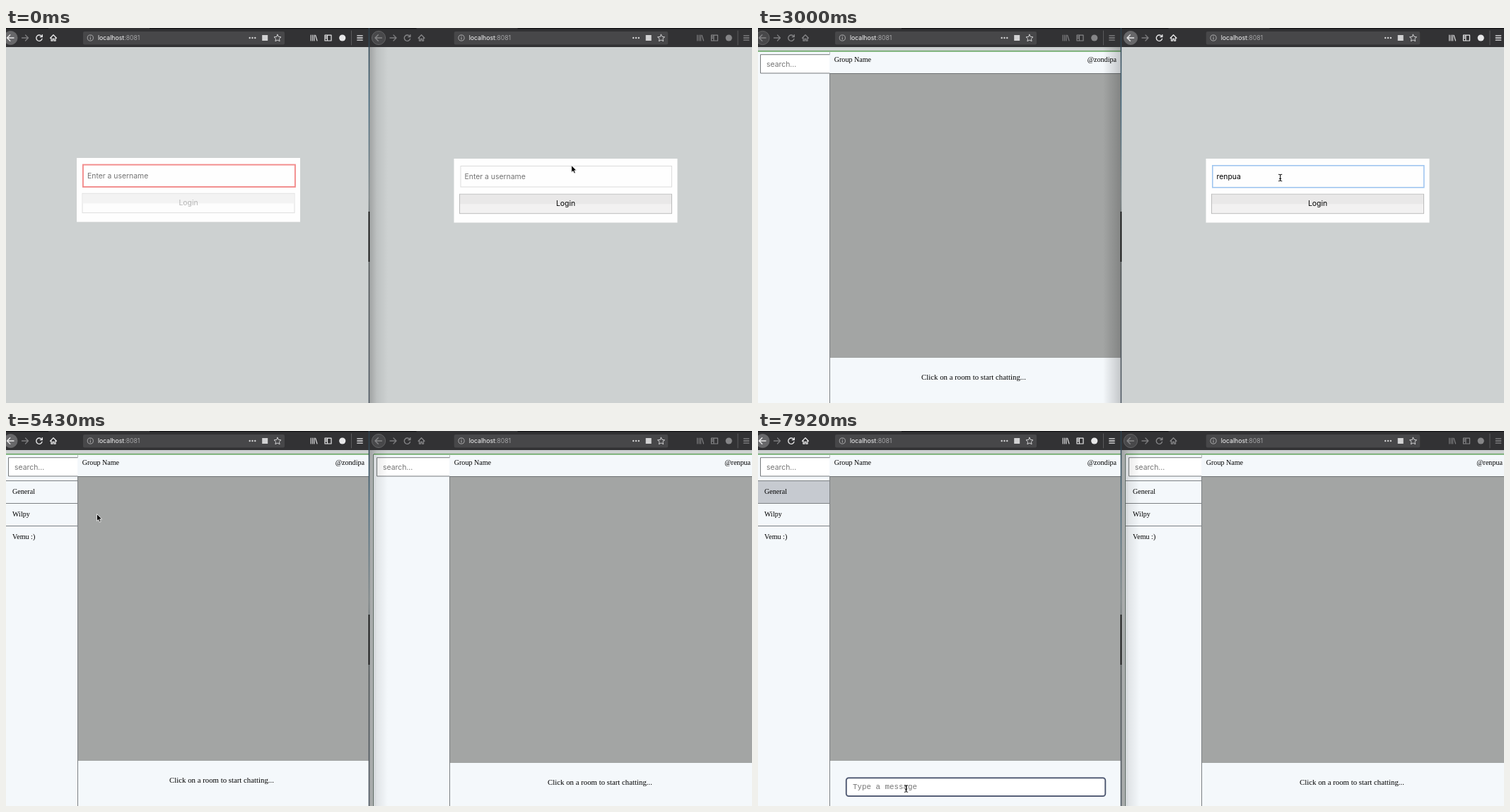
An HTML page for the animation above (8 s loop, 1055 by 531 pixels).

```html
<!DOCTYPE html>
<html lang="en">
<head>
<meta charset="utf-8">
<title>Chat login</title>
<style>
html, body { margin: 0; width: 100%; height: 100%; overflow: hidden; background: #cdd1d1; }
svg { display: block; }
text { white-space: pre; }
.ui { font-family: Inter, sans-serif; font-size: 10.4px; }
.url { font-family: Inter, sans-serif; font-size: 8.7px; }
.serif { font-family: "Liberation Serif", serif; font-size: 10.1px; }
.mono { font-family: "Liberation Mono", monospace; font-size: 10.83px; }
</style>
</head>
<body>
<svg id="stage" width="1055" height="531" viewBox="0 0 1055 531"></svg>
<script>
const rect = (x, y, w, h, fill, more = '') =>
  `<rect x="${x}" y="${y}" width="${w}" height="${h}" fill="${fill}" ${more}/>`;
const text = (x, y, cls, str, fill = '#000', more = '') =>
  `<text x="${x}" y="${y}" class="${cls}" fill="${fill}" ${more}>${str}</text>`;
const line = (d, color = 'currentColor', w = 1.2) =>
  `<path d="${d}" fill="none" stroke="${color}" stroke-width="${w}" stroke-linecap="round" stroke-linejoin="round"/>`;
const group = (id, body, dx = 0, dy = 0) =>
  `<g id="${id}" transform="translate(${dx} ${dy})">${body}</g>`;
const MID = 'text-anchor="middle"', END = 'text-anchor="end"';
const PAGE = '#cdd1d1', PANEL = '#f4f8fb', RULE = '#7d8184';

// Browser toolbar; the groups shift separately because the windows differ in width
function toolbar(p, x, w, urlW, dNav, dUrl, dStar, dMenu) {
  const nav =
    `<circle id="${p}Back" cx="6.5" cy="14" r="9.6" stroke="#6c6c6e" stroke-width=".8"/>` +
    line('M11 14H1.5M5.8 9.7L1.5 14l4.3 4.3', 'currentColor', 1.4) +
    line('M22.5 14H31.5M27.5 10l4 4-4 4', '#7c7c7e', 1.3) +
    line('M50.6 12A4.2 4.2 0 1 0 51 15.4M51.3 9.6v3h-3', 'currentColor', 1.4) +
    line('M62.6 14.2L67 9.8l4.4 4.4M64 13.8V18.2h2v-2.8h2v2.8h2v-4.4', 'currentColor', 1.3);
  const url =
    rect(109, 5, urlW, 18.6, '#474749', 'rx="2"') +
    '<circle cx="119.3" cy="14" r="4.1" fill="none" stroke="#b4b4b5" stroke-width=".9"/>' +
    line('M119.3 13.6v2.4M119.3 11.8v.1', '#b4b4b5', 1) +
    text(130, 17.2, 'url', 'localhost<tspan fill="#a5a5a7">:8081</tspan>', '#f9f9fa');
  const star =
    [344.7, 348.5, 352.3].map(cx => `<circle cx="${cx}" cy="14" r="1.2" fill="#d2d2d3"/>`).join('') +
    rect(362.2, 10, 8, 8, '#d2d2d3') +
    line('M384 9.2l1.5 3.2 3.5.4-2.6 2.4.7 3.5-3.1-1.7-3.1 1.7.7-3.5-2.6-2.4 3.5-.4z', '#d2d2d3', 1);
  const menu =
    line('M431.2 10v8M433.7 10v8M436 10v8M437.6 10.2l2.4 7.8', 'currentColor', 1.1) +
    line('M451 10.2h9v7.8h-9zM454.4 10.2v7.8M452.3 12.4h.8M452.3 14.4h.8') +
    '<circle cx="475.7" cy="14" r="4.6" fill="currentColor"/>' +
    line('M488.5 4V24', '#5a5a5c', 1) +
    line('M496.8 10.8h7.4M496.8 14h7.4M496.8 17.2h7.4', 'currentColor', 1.3);
  return rect(x, 0, w, 27, '#323234') +
    rect(x, 0, 60 + dNav - x, 1.2, '#101012') +
    rect(203 + dNav, 0, x + w - 203 - dNav, 1.2, '#101012') +
    group(p + 'Nav', nav, dNav) + group(p + 'Url', url, dUrl) +
    group(p + 'Star', star, dStar) + group(p + 'Menu', menu, dMenu);
}

// Login card with its field and button
function login(p, dx, dy) {
  return group(p + 'Login',
    rect(100, 184, 316, 90.6, '#fefefe') +
    `<rect id="${p}Field" fill="#fefefe"/>` +
    text(115, 213.2, 'ui', '', '#000', `id="${p}Value"`) +
    `<rect id="${p}Btn" x="108" y="234.3" width="300" height="27.4" stroke-width="1"/>` +
    `<rect id="${p}Top" x="108.5" y="234.8" width="299" height="13.6"/>` +
    text(258, 251.2, 'ui', 'Login', '#000', `id="${p}Label" ${MID}`), dx, dy);
}

const fieldStyles = {
  plain: [109.5, 194.5, 298.5, 29.5, '#dcdcdc', 1],
  focus: [109.3, 193.8, 299, 31, '#a0c6f0', 1.6],
  error: [108.9, 193.6, 300, 31.4, '#f28b8b', 1.9]
};

// Chat page: x0 and x1 bound the sidebar, "foot" is where the footer starts
function chat(p, x0, x1, end, foot, user, userX, footX) {
  const dx = x0 ? 521 : 0;
  const rooms = ['General', 'Wilpy', 'Vemu :)'].map((name, i) =>
    rect(x0, 70 + 32 * i, x1 - x0, 1, RULE) + text(9 + dx, 89 + 32 * i, 'serif', name)).join('');
  return group(p + 'Chat',
    rect(x0, 27, end - x0, 504, PAGE) +
    rect(x0, 33, end - x0, 498, PANEL) +
    rect(x0, 32.3, end - x0, 1.2, '#42943a') +
    rect(x0 ? x0 + 4.5 : 3.5, 38, x1 - x0 - (x0 ? 4.5 : 3.5), 26, '#fff') +
    line(`M${x1} 37.7H${x0 ? x0 + 4.5 : 3.5}V64H${x1}`, '#75797c', 1) +
    rect(x1, 33.5, 1, 4.5, '#b5b9bb') +
    text(12 + dx, 54.6, 'ui', 'search...', '#757575') +
    rect(x1, 64, end - x1, 1, '#6f7375') +
    rect(x1 + 1, 65, end - x1 - 1, foot - 65, '#a3a5a4') +
    rect(x1, 64, 1, 467, RULE) +
    text(x1 + 6.7, 48, 'serif', 'Group Name') +
    text(userX, 48, 'serif', user, '#000', END) +
    `<rect id="${p}Hot" x="${x0}" y="71" width="${x1 - x0}" height="31" fill="none"/>` +
    group(p + 'Rooms', rooms) +
    group(p + 'Hint', text(footX, foot + 31, 'serif', 'Click on a room to start chatting...', '#000',
      `${MID} style="font-size:10.81px"`)));
}

const $ = id => document.getElementById(id);
const show = (id, on) => $(id).setAttribute('display', on ? 'inline' : 'none');
const set = (id, attrs) => { for (const k in attrs) $(id).setAttribute(k, attrs[k]); };

$('stage').innerHTML = `<defs>
  <linearGradient id="fadeL"><stop offset="0" stop-opacity="0"/><stop offset="1" stop-opacity=".2"/></linearGradient>
  <linearGradient id="fadeR"><stop offset="0" stop-opacity=".22"/><stop offset=".4" stop-opacity=".08"/><stop offset="1" stop-opacity="0"/></linearGradient>
  <linearGradient id="edge" x2="0" y2="1"><stop offset="0" stop-color="#2d3f4a"/><stop offset=".2" stop-color="#45687d"/>
    <stop offset=".45" stop-color="#7d8688"/><stop offset=".65" stop-color="#4b5153"/><stop offset="1" stop-color="#4b5560"/></linearGradient>
  </defs>` +
  rect(0, 0, 1055, 531, PAGE) +
  login('l', 0, 0) + chat('l', 0, 101, 513, 467, '@zondipa', 507, 305) +
  group('message', rect(124.8, 491.3, 366.4, 25.8, '#fff', 'rx="3.5" stroke="#566078" stroke-width="2"') +
    text(134, 507.4, 'mono', 'Type a message', '#757575')) +
  login('r', 533.5, 1) + chat('r', 520, 627, 1055, 470, '@renpua', 1053, 840) +
  group('gutter', rect(519, 33, 1, 498, '#6f7c74')) +
  toolbar('l', 0, 513, 285, 0, 0, 0, 0) + toolbar('r', 514, 541, 302.5, 520.5, 524.7, 542.5, 546.5) +
  rect(488, 27, 25, 504, 'url(#fadeL)', 'id="lShade"') +
  rect(514, 27, 26, 504, 'url(#fadeR)', 'id="rShade"') +
  rect(512.7, 0, 1.5, 531, 'url(#edge)') + rect(512.7, 260, 1.5, 71, '#050505') +
  `<g id="cursor">
    <path id="arrow" d="M0 0V10L2.3 8 3.9 11.6 5.6 10.8 4.1 7.3H7.2Z" fill="#000" stroke="#fff" stroke-width=".8"/>
    <g id="beam">${line('M-2.2 -4.8Q0 -4.8 0 -3.6Q0 -4.8 2.2 -4.8M0 -3.6V3.6M-2.2 4.8Q0 4.8 0 3.6Q0 4.8 2.2 4.8M-1 1.4H1', '#111', 1.1)}</g>
    <path id="hand" d="M-2.6 -5.2Q-1.7 -6.2 -.9 -5.2L-.3 -1.9Q.7 -2.6 1.3 -1.6Q2.3 -2.2 2.8 -1.2Q4 -1.6 4.3 -.4Q4.8 2.6 3.5 5.3H-1.2Q-2 3.4 -4.2 1.5Q-4.6 .3 -3.2 .3L-1.8 1.2Z" fill="#fff" stroke="#111" stroke-width=".9"/>
  </g>`;

// Start time, x, y and shape; each pose holds until the next
const poses = [
  [0, 799.7, 194.5, 'arrow'], [180, 797, 198, 'arrow'], [360, 780, 208, 'beam'],
  [540, 758, 212, 'beam'], [750, 742, 212, 'beam'], [950, 738.6, 212, 'beam'],
  [1160, 0, 0, 'none'], [2640, 738.6, 212, 'beam'],
  [3960, 676, 168, 'arrow'], [4140, 611, 133, 'arrow'],
  [4500, 570, 136, 'arrow'], [4680, 430, 148, 'arrow'], [4860, 310, 164, 'arrow'],
  [5070, 262, 170, 'arrow'], [5250, 247.8, 165.5, 'arrow'], [5430, 128.5, 117.5, 'arrow'],
  [5640, 104, 106, 'arrow'], [5820, 74, 100, 'hand'], [6020, 64.5, 99, 'hand'],
  [6890, 82, 140, 'arrow'], [7070, 130, 250, 'arrow'], [7250, 190, 370, 'arrow'],
  [7400, 230, 440, 'arrow'], [7560, 247.3, 469.5, 'arrow'],
  [7740, 229, 493, 'beam'], [7920, 209.5, 506.5, 'beam']
];
const typing = [[0, ''], [1700, 're'], [1880, 'ren'], [2070, 'renpu'], [2250, 'renpua'], [3780, '']];
const hot = [[0, 'none'], [5820, '#e8ecef'], [6020, '#dde1e5'], [6530, '#d0d4d9'], [6710, '#c6cad0']];
const at = (list, t) => list.filter(e => e[0] <= t).pop();

function setWindow(p, active) {
  const color = active ? '#e8e8e9' : '#858587';
  set(p + 'Nav', { color });
  set(p + 'Menu', { color });
  set(p + 'Back', { fill: active ? '#68686a' : '#48484a' });
  show(p + 'Shade', !active);
}

function setLogin(p, value, look) {
  const [x, y, width, height, stroke, w] = fieldStyles[look], off = look === 'error';
  set(p + 'Field', { x, y, width, height, stroke, 'stroke-width': w });
  $(p + 'Value').textContent = value || 'Enter a username';
  set(p + 'Value', { fill: value ? '#000' : '#737373' });
  set(p + 'Btn', { fill: off ? '#fdfdfd' : '#f2f1f1', stroke: off ? '#dedede' : '#bcbcbc' });
  set(p + 'Top', { fill: off ? '#f3f3f3' : '#e9e8e8' });
  set(p + 'Label', { fill: off ? '#b4b4b4' : '#000' });
}

function draw(t) {
  const rightActive = t >= 360 && t < 4860;
  setWindow('l', !rightActive);
  setWindow('r', rightActive);
  setLogin('l', '', 'error');
  setLogin('r', at(typing, t)[1], t < 360 ? 'plain' : t < 3780 ? 'focus' : 'error');

  show('lLogin', t < 3000);
  show('lChat', t >= 3000);
  show('lRooms', t >= 3180);
  show('lHint', t < 6710);
  show('message', t >= 6710);
  set('lHot', { fill: at(hot, t)[1] });

  show('rLogin', t < 5430);
  show('rChat', t >= 5430);
  show('gutter', t >= 5430);
  show('rRooms', t >= 5640);

  const [, x, y, shape] = at(poses, t);
  for (const id of ['arrow', 'beam', 'hand']) show(id, id === shape);
  set('cursor', { transform: `translate(${x} ${y})` });
}

function tick() {
  draw(performance.now() % 8000);
  requestAnimationFrame(tick);
}
tick();
</script>
</body>
</html>
```
